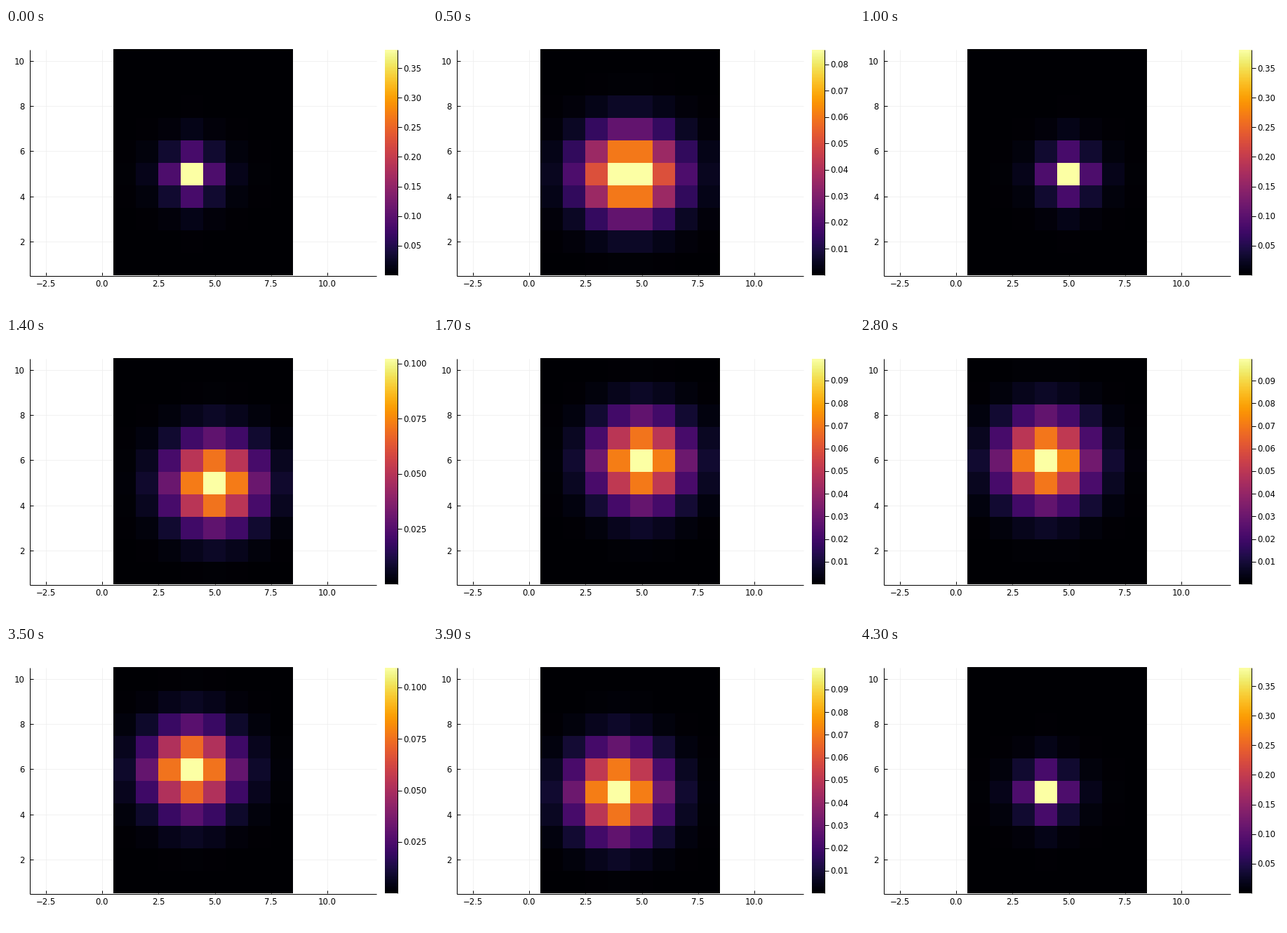
A matplotlib script for the animation above (4400 ms loop, 600x400 px).

```python
import numpy as np
import matplotlib.pyplot as plt
from matplotlib.animation import FuncAnimation

W, H, DPI = 600, 400, 100
LEFT, RIGHT, TOP, BOTTOM = 34, 528, 31, 352
BAR_LEFT, BAR_RIGHT = 540, 558
UNIT = 32.1                      # pixels per data unit
CELL = 32
STEPS = 11                       # frames per hop
PATH = [(4, 5), (5, 5), (5, 6), (4, 6)]

ROWS, COLS = np.mgrid[1:11, 1:9]


def px(x):
    return 137 + UNIT * x


def py(y):
    return BOTTOM - UNIT * (y - .5)


def blob(center, spread):
    """Peak with stretched-exponential flanks; spread 0 is tight, 1 is wide."""
    peak = .381 * (.0995 / .381) ** spread
    decay = 1.55 * np.exp(-1.461 * spread)
    power = 1.06 + .766 * spread
    norm = (power + 1.9) / 2
    dx = .96 * abs(COLS - center[0])
    dy = abs(ROWS - center[1])
    return peak * np.exp(-decay * (dx**norm + dy**norm) ** (power / norm))


def density(frame):
    hop, i = divmod(frame, STEPS)
    spread = 1 - np.exp(-1.317 * min(i, STEPS - 1 - i))
    w = 1 / (1 + np.exp(-4 * (i - 5)))
    a, b = PATH[hop], PATH[(hop + 1) % len(PATH)]
    return (1 - w) * blob(a, spread) + w * blob(b, spread)


fig = plt.figure(figsize=(W / DPI, H / DPI), dpi=DPI, facecolor="white")
ax = fig.add_axes([0, 0, 1, 1])
ax.axis("off")


def line(xs, ys, color="black", width=1.0, z=4):
    return ax.plot(xs, ys, color=color, lw=width * 72 / DPI, zorder=z,
                   solid_capstyle="butt", snap=True)[0]


def label(x, y, s, ha):
    return ax.text(x, y, s, ha=ha, va="center_baseline", fontsize=8.4,
                   family="DejaVu Sans", color="black", zorder=5)


for v in np.arange(-2.5, 10.1, 2.5):
    x = px(v)
    line([x, x], [TOP, BOTTOM], "#eeeeee", .8, 1)
    line([x, x], [BOTTOM, BOTTOM - 4.5])
    label(x, 363.2, f"{v:.1f}".replace("-", "\u2212"), "center")
for v in range(2, 11, 2):
    y = py(v)
    line([LEFT, RIGHT], [y, y], "#eeeeee", .8, 1)
    line([LEFT, LEFT + 5], [y, y])
    label(26.5, y, str(v), "right")
line([LEFT, LEFT], [TOP, BOTTOM + 1])
line([LEFT, RIGHT], [BOTTOM + 1, BOTTOM + 1])

# Cells fall on whole pixels; the top row takes up the remainder.
x_edges = 153 + CELL * np.arange(9)
y_edges = BOTTOM - CELL * np.arange(11)
y_edges[-1] = TOP - 1
heat = ax.pcolormesh(x_edges, y_edges, density(0), cmap="inferno",
                     antialiased=False, linewidth=0, zorder=3)
ax.imshow(np.linspace(0, 1, 256)[:, None], cmap="inferno", origin="lower",
          aspect="auto", interpolation="nearest",
          extent=(BAR_LEFT, BAR_RIGHT, BOTTOM, TOP), zorder=3)
line([BAR_RIGHT, BAR_RIGHT], [TOP, BOTTOM])
ax.set(xlim=(0, W), ylim=(H, 0))

ticks = []


def draw(frame):
    p = density(frame)
    top = p.max()
    heat.set_array(p)
    heat.set_clim(p.min(), top)

    while ticks:
        ticks.pop().remove()
    step = .05 if top > .13 else .025 if top > .1 else .01
    digits = 3 if step == .025 else 2
    for v in np.arange(step, top, step):
        y = BOTTOM - (BOTTOM - TOP) * v / top
        ticks.append(line([BAR_RIGHT, BAR_RIGHT + 6], [y, y]))
        ticks.append(label(566, y - .6, f"{v:.{digits}f}", "left"))
    return [heat, *ticks]


anim = FuncAnimation(fig, draw, frames=STEPS * len(PATH), interval=100,
                     repeat=True, repeat_delay=0, blit=False)
plt.show()
```
